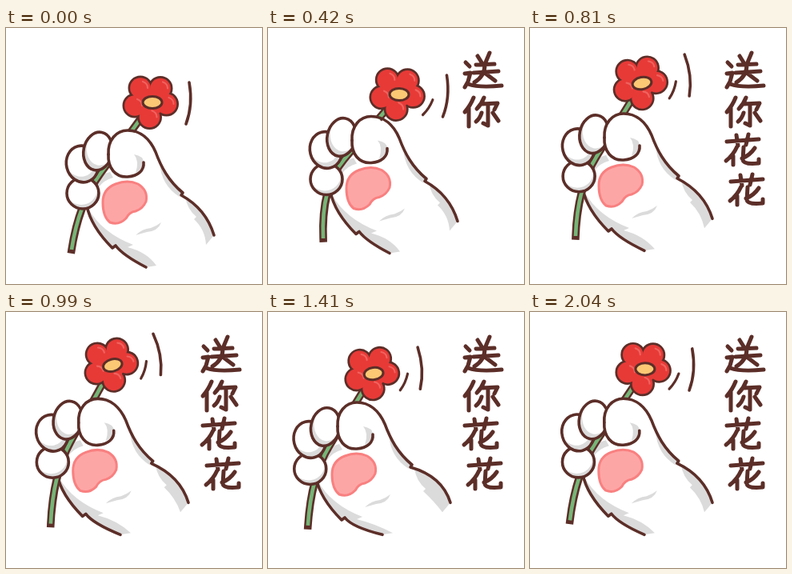
Write an HTML page with a canvas that moves like this. It is 320 px wide and 320 px high and loops after 2070 ms.

```html
<!DOCTYPE html>
<html lang="zh">
<head>
<meta charset="utf-8">
<style>
html, body { margin: 0; width: 100%; height: 100%; overflow: hidden; background: #fff; }
canvas { display: block; }
</style>
</head>
<body>
<canvas id="stage" width="320" height="320" role="img" aria-label="送你花花"></canvas>
<script>
const ctx = document.getElementById('stage').getContext('2d');
const BROWN = '#5c2e28', GREY = '#dbdbdb', RED = '#e73a37';
const LOOP = 2070, STEP = 30;
const ARM_STOP = 640; // from here on the wrist rests while the hand sways

// time, hand x, hand y, flower x, flower y, stem end x, stem end y, flower tilt (deg)
const KEYS = [
  [0, 0, 0, 183, 93, 82, 277, 0],
  [270, -15, -11, 173, 89, 77, 268, 4],
  [420, -23, -17.5, 164, 83, 69, 263, 1],
  [540, -29.5, -20, 155, 77, 64, 261, -4],
  [810, -35, -21, 140, 69, 57, 260, -11],
  [960, -37, -20, 134, 66, 56, 264, -15],
  [1170, -38.5, -17, 131, 73, 55, 267, -11],
  [1400, -41, -15, 132, 77, 50, 267, -8],
  [1650, -38, -17, 136, 75, 49, 265, -5],
  [2070, -35, -20, 144.5, 71, 50, 260, 0]
];

// hand lettering: start time, offset, strokes
const HUA = 'M246,142L286,139M258,134L260,147M273,133L270,146M259,148Q254,159 245,166' +
  'M254,160V171M281,150Q275,159 265,163M267,149L266,165Q267,171 286,169V164';
const LETTERS = [
  [180, 0, 0, 'M262,35L267,43M277,31L272,43M260,46L283,45M257,56L288,54M271,46Q271,60 258,68' +
    'M272,57L284,66M247,43L252,48M246,57L253,56L250,67L246,74M250,70Q264,75 292,72'],
  [360, 0, 0, 'M257,87Q253,97 246,105M251,100V123M270,87Q267,95 261,101M267,95L287,94L283,102' +
    'M275,97V122L269,119M267,106Q265,113 260,117M281,106L288,116'],
  [540, 0, 0, HUA],
  [720, 5, 50, HUA]
].map(([start, x, y, d]) => ({ start, x, y, path: new Path2D(d) }));

const PETALS = [[-15, -18], [10, -17.5], [17.5, 2], [-3.5, 18.5], [-22, 4]];

function paint(d, fill, stroke, width = 3.6) {
  const path = d instanceof Path2D ? d : new Path2D(d);
  if (fill) { ctx.fillStyle = fill; ctx.fill(path); }
  if (stroke) { ctx.strokeStyle = stroke; ctx.lineWidth = width; ctx.stroke(path); }
}

function ellipse(x, y, rx, ry = rx, turn = 0) {
  const path = new Path2D();
  path.ellipse(x, y, rx, ry, turn, 0, 7);
  return path;
}

function group(x, y, draw) {
  ctx.save();
  ctx.translate(x, y);
  draw();
  ctx.restore();
}

// smooth curve through the keys
function pose(t) {
  let i = 0;
  while (t >= KEYS[i + 1][0]) i++;
  const a = KEYS[i], b = KEYS[i + 1], before = KEYS[i - 1] || a, after = KEYS[i + 2] || b;
  const span = b[0] - a[0], u = (t - a[0]) / span;
  return a.slice(1).map((p, k) => {
    const c = k + 1, q = b[c];
    const m = (q - before[c]) / (b[0] - before[0]) * span;
    const n = (after[c] - p) / (after[0] - a[0]) * span;
    const d = q - p;
    return p + u * (m + u * (3 * d - 2 * m - n + u * (m + n - 2 * d)));
  });
}

// dx, dy: how far the wrist lags behind the hand
function palm(dx, dy) {
  const wrist = (x, y) => `${x + dx},${y + dy}`;
  const side = `C168,128 180,139 187,155C194,174 203,191 221,206L219,209Q${wrist(250, 226)} ${wrist(260, 259)}`;
  const outer = wrist(250, 271), end = wrist(175, 299), tail = wrist(188, 297);
  paint(`M128,158C127,140 138,128 152,128${side}L${outer}L${tail}L${end}L137,272L133,275Q106,248 101,222Z`, '#fff');
  paint(`M103,226C110,248 125,266 134,273L138,271Q146,284 ${end}L${tail}Q176,280 152,274L159,271Q120,256 103,226Z`, GREY);
  paint(`M224,210Q${wrist(250, 230)} ${wrist(260, 259)}L${outer}Q249,252 235,239L238,236Q226,226 224,210Z`, GREY);
  paint('M192,168Q202,191 220,206L217,211Q194,197 192,168Z', GREY);
  paint('M112,196Q118,182 130,180L134,187Q122,190 115,200Z', GREY);
  paint('M162,259Q170,251 181,250Q189,247 194,243Q190,254 176,255Z', GREY);
  paint('M121,218Q121,201 137,195Q152,189 165,195Q178,203 175,217Q171,226 162,229Q154,230 150,238Q141,247 130,243Q121,236 121,218Z',
    '#fda6a6', '#f98080', 3);
  paint(`M101,222Q106,248 133,275L137,272Q146,284 ${end}`, null, BROWN);
  return 'M128,158C127,140 138,128 152,128' + side;
}

function finger(x, y, rx, ry, turn, dx, dy) {
  const shape = ellipse(x, y, rx, ry, turn);
  ctx.save();
  ctx.clip(shape);
  paint(shape, GREY);
  paint(ellipse(x + dx, y + dy, rx, ry, turn), '#fff');
  ctx.restore();
  paint(shape, null, BROWN);
}

function stem(hold, flower, end) {
  const c = [0, 1].map(k => hold[k] - 0.42 * (flower[k] - hold[k]));
  const d = `M${end}Q${c} ${hold}L${flower}`;
  ctx.lineCap = 'square';
  paint(d, null, BROWN, 9.5);
  ctx.lineCap = 'butt';
  paint(d, null, '#76b577', 4.6);
  ctx.lineCap = 'round';
}

function flower(t) {
  PETALS.forEach(([x, y]) => paint(ellipse(x, y, 13), null, BROWN, 5));
  PETALS.forEach(([x, y]) => paint(ellipse(x, y, 12.8), RED));
  paint(ellipse(-2, 0, 17), RED);
  PETALS.forEach(([x, y]) => paint(`M${x + 3},${y - 8}q6,2 6,8`, null, '#f0625e', 2.2));
  paint(ellipse(0, 0, 12, 7.6), '#fdc874', BROWN, 3);
  const early = t < 90;
  group(early ? -13 + t / 9 : 0, 0, () => paint('M59,-25Q64,3 55,27', null, BROWN));
  if (!early) paint('M42,6Q38,17 30,25', null, BROWN, 3.2);
}

function draw(t) {
  const [hx, hy, fx, fy, ex, ey, tilt] = pose(t);
  const [ax, ay] = pose(Math.min(t, ARM_STOP));
  const sag = hy - ay;
  ctx.fillStyle = '#fff';
  ctx.fillRect(0, 0, 320, 320);
  ctx.lineCap = ctx.lineJoin = 'round';

  let outline;
  group(hx, hy, () => { outline = palm(ax - hx, ay - hy); });
  stem([118 + hx, 182 + hy], [fx, fy], [ex, ey]);
  group(fx, fy, () => {
    ctx.rotate(tilt * Math.PI / 180);
    flower(t);
  });
  group(hx - 0.4 * sag, hy + 0.8 * sag, () => {
    finger(96, 206.5, 20, 19.5, 0, -2, -5);
    finger(95.5, 170, 20, 23, -0.25, -3, -7);
    finger(115, 154, 18, 24, 0.2, 4, -6);
  });
  group(hx, hy, () => {
    paint(ellipse(151, 157, 23, 29), '#fff');
    paint('M172,168Q172,160 160,158Q167,166 162,181Q170,177 172,168Z', GREY);
    paint(outline, null, BROWN);
    paint('M128,158C127,175 137,187 152,186C165,185 173,178 172,168', null, BROWN);
  });
  for (const { start, x, y, path } of LETTERS) {
    if (t >= start) group(x, y, () => paint(path, null, BROWN, 5));
  }
}

const began = performance.now();
function tick() {
  const t = Math.max(0, performance.now() - began) % LOOP;
  draw(Math.floor(t / STEP) * STEP);
  requestAnimationFrame(tick);
}
tick();
</script>
</body>
</html>
```
